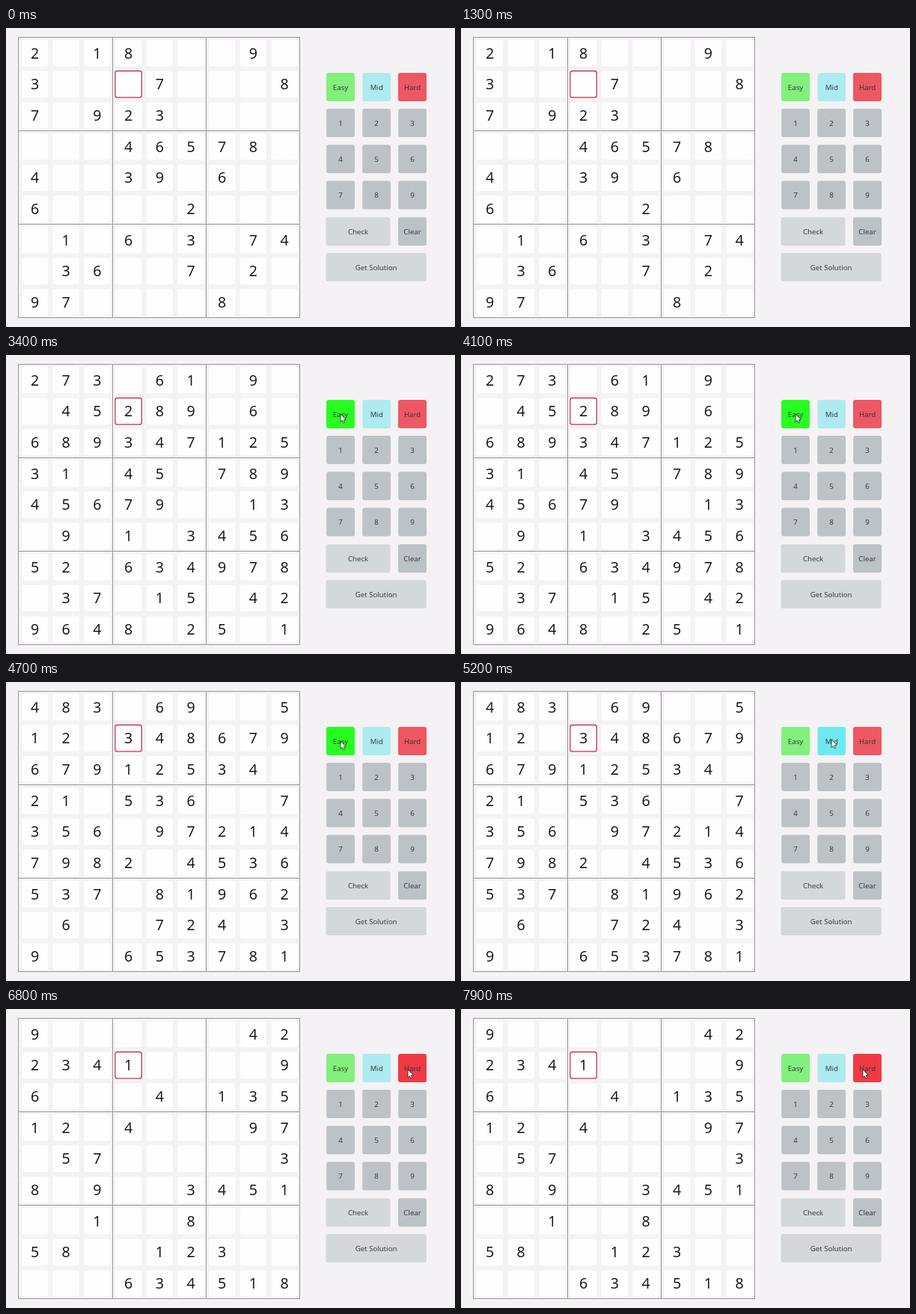
An HTML page with a canvas that plays this animation: 600 by 400 pixels, repeating every 8 s.

```html
<!DOCTYPE html>
<html lang="en">
<head>
<meta charset="utf-8">
<title>Sudoku</title>
<style>
  html, body { margin: 0; width: 100%; height: 100%; overflow: hidden; background: #f4f2f4; }
  canvas { display: block; width: 600px; height: 400px; }
</style>
</head>
<body>
<canvas id="stage" width="600" height="400"></canvas>
<script>
const ctx = document.getElementById('stage').getContext('2d');
const LOOP = 8000, STEP = 100, PITCH = 41.7;
const FONT = '"Open Sans", "Noto Sans", sans-serif';

// Each board appears at its time; a dot is an empty cell.
const boards = [
  [0, '2.18...9. 3...7...8 7.923.... ...46578. 4..39.6.. 6....2... .1.6.3.74 .36..7.2. 97....8..'],
  [3300, '273.61.9. .45289.6. 689347125 31.45.789 45679..13 .9.1.3456 52.634978 .37.15.42 9648.25.1'],
  [4700, '483.69..5 12.348679 67912534. 21.536..7 356.97214 7982.4536 537.81962 .6..724.3 9..653781'],
  [5600, '95..27.31 .23.684.9 4.71.925. 214..68.. .7589..46 .89714..5 5.267.9.4 74.9.3.6. .9.24....'],
  [6600, '9......42 2341....9 6...4.135 12.4...97 .57.....3 8.9..3451 ..1..8... 58..123.. ...634518']
].map(([at, rows]) => ({ at, rows: rows.split(' ') }));

// Pointer path: time, x, y of the tip
const path = [
  [2800, 478, 18], [3100, 447, 79], [4800, 447, 79], [5100, 495, 77],
  [5800, 495, 77], [6000, 522, 81], [6200, 537, 81], [8000, 537, 81]
];

const GREY = '#bcc2c6', PALE = '#d4d8da';
const button = (label, x, y, w, color, hover = color) => ({ label, x, y, w, h: 38, color, hover });
const buttons = [
  button('Easy', 428, 60, 38, '#82f07c', '#27fe20'),
  button('Mid', 476.5, 60, 37.5, '#aeebf0', '#6deaf0'),
  button('Hard', 524, 60, 38, '#ed5862', '#ef3a44'),
  button('Check', 427.5, 253.3, 86, PALE),
  button('Clear', 524, 253.3, 38, GREY),
  button('Get Solution', 427.5, 301, 134.3, PALE)
];
for (let i = 0; i < 9; i++) {
  buttons.push(button(String(i + 1), 428.2 + (i % 3) * 48, 108 + Math.floor(i / 3) * 48.3, 37.8, GREY));
}

function box(x, y, w, h, r) {
  ctx.beginPath();
  ctx.roundRect(x, y, w, h, r);
}

function pointerAt(t) {
  if (t < path[0][0]) return null;
  for (let i = 1; i < path.length; i++) {
    const [t0, x0, y0] = path[i - 1], [t1, x1, y1] = path[i];
    if (t <= t1) {
      const k = (t - t0) / (t1 - t0);
      return { x: x0 + (x1 - x0) * k, y: y0 + (y1 - y0) * k };
    }
  }
}

function drawBoard(rows) {
  ctx.font = '19.6px ' + FONT;
  for (let r = 0; r < 9; r++) {
    for (let c = 0; c < 9; c++) {
      const x = 38.5 + c * PITCH, y = 33.5 + r * PITCH;
      box(x - 17.7, y - 17.7, 35.4, 35.4, 3);
      ctx.fillStyle = '#fefeff';
      ctx.fill();
      if (r === 1 && c === 3) {
        ctx.strokeStyle = '#cb3547';
        ctx.lineWidth = 1.3;
        ctx.stroke();
      }
      if (rows[r][c] !== '.') {
        ctx.fillStyle = '#101010';
        ctx.fillText(rows[r][c], x, y + 7);
      }
    }
  }
  ctx.strokeStyle = '#99979a';
  ctx.lineWidth = 1;
  ctx.beginPath();
  for (let i = 0; i < 4; i++) {
    const x = [16.5, 142.5, 267.5, 392.5][i], y = 12.5 + i * 125;
    ctx.moveTo(x, 12);
    ctx.lineTo(x, 388);
    ctx.moveTo(16, y);
    ctx.lineTo(393, y);
  }
  ctx.stroke();
}

function drawButton(b, p) {
  const over = p && p.x >= b.x && p.x <= b.x + b.w && p.y >= b.y && p.y <= b.y + b.h;
  box(b.x, b.y, b.w, b.h, 3);
  ctx.fillStyle = over ? b.hover : b.color;
  ctx.fill();
  ctx.font = '9.7px ' + FONT;
  ctx.fillStyle = '#303336';
  ctx.fillText(b.label, b.x + b.w / 2, b.y + 22.6);
}

function drawPointer({ x, y }) {
  const tip = [[0, 0], [0, 10.6], [2.4, 8.4], [4, 12], [5.7, 11.2], [4.2, 7.8], [7.4, 7.6]];
  ctx.beginPath();
  tip.forEach(([dx, dy]) => ctx.lineTo(x + dx, y + dy));
  ctx.closePath();
  ctx.fillStyle = '#fff';
  ctx.fill();
  ctx.strokeStyle = '#222';
  ctx.lineWidth = 0.8;
  ctx.stroke();
}

function draw(now) {
  const t = Math.floor((now % LOOP) / STEP) * STEP;
  const pointer = pointerAt(t);
  ctx.fillStyle = '#f4f2f4';
  ctx.fillRect(0, 0, 600, 400);
  ctx.textAlign = 'center';
  drawBoard(boards.filter(b => b.at <= t).pop().rows);
  buttons.forEach(b => drawButton(b, pointer));
  if (pointer) drawPointer(pointer);
}

const start = performance.now();
function frame() {
  draw(performance.now() - start);
  requestAnimationFrame(frame);
}
frame();
</script>
</body>
</html>
```
